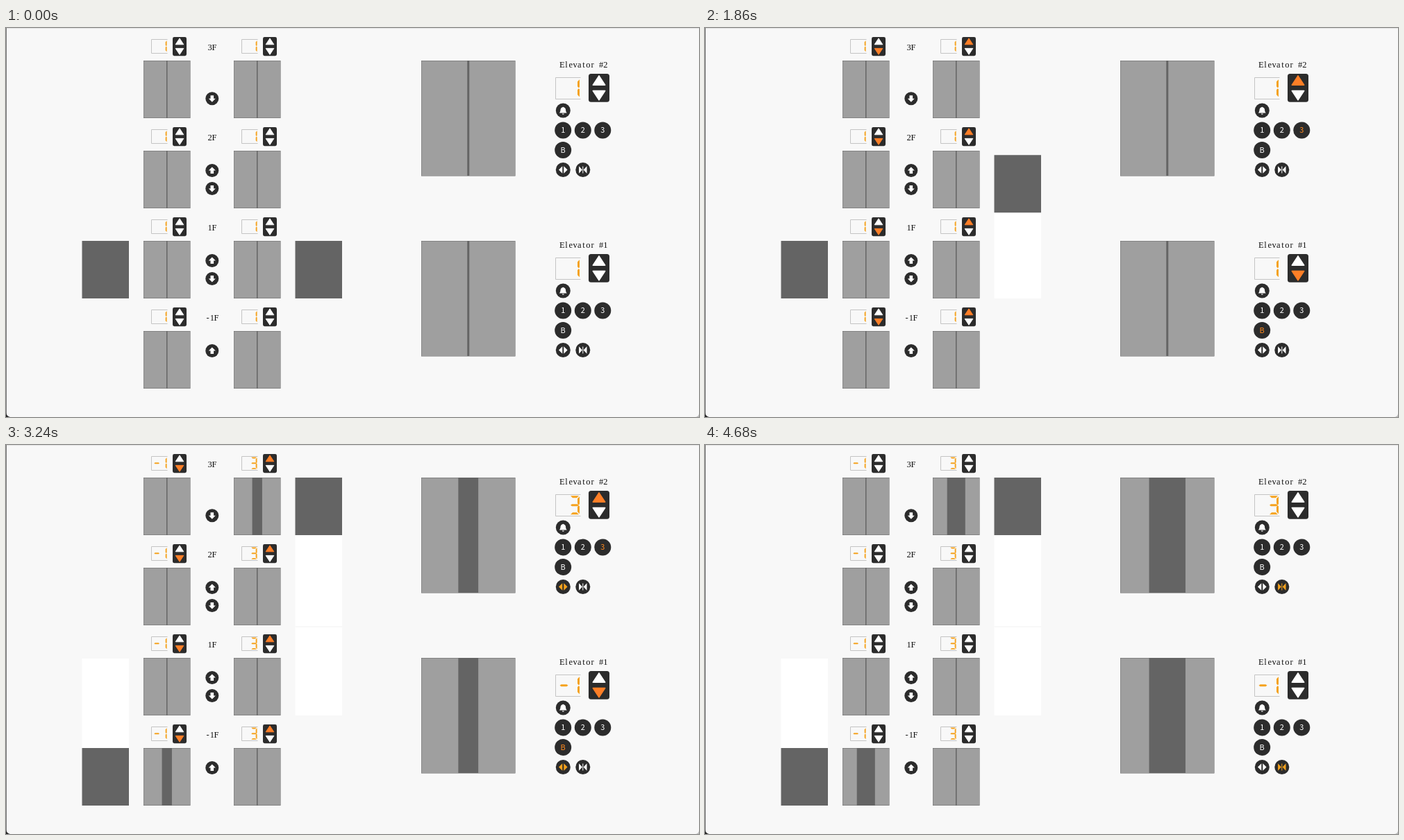
Animation, 998 px wide and 561 px high, one loop 4.71 s. Source, as an HTML page:

```html
<!DOCTYPE html>
<html lang="en">
<head>
<meta charset="utf-8">
<title>Elevators</title>
<style>
html, body { margin: 0; width: 100%; height: 100%; overflow: hidden; background: #f8f8f8; }
svg { display: block; width: 998px; height: 561px; }
text { text-anchor: middle; }
.label { font: 12.5px "Liberation Serif", serif; fill: #111; }
.key { font: 500 11px "Noto Sans CJK SC", "Noto Sans", sans-serif; }
.dark { fill: #2c2c2c; }
.car { fill: #646464; }
.door { fill: #9f9f9f; }
.seg { fill: #f5a21d; }
.frame { fill: none; stroke: #c4c4c4; }
</style>
</head>
<body>
<svg id="stage" viewBox="0 0 998 561"></svg>
<script>
const LOOP = 4710, STEP = 30;
const SPEED = 0.1067;               // car speed, px per ms
const WHITE = '#fff', ORANGE = '#ff7f27', AMBER = '#f5a21d';
const FLOORS = ['3F', '2F', '1F', '-1F'];
const floorY = i => 47 + 130 * i;

const SEG = {
  a: 'M1 0H13L10 3H4Z',
  b: 'M14 1V12L12.6 13L11 11V4Z',
  c: 'M14 26V15L12.6 14L11 16V23Z',
  d: 'M1 27H13L10 24H4Z',
  e: 'M0 26V15L1.4 14L3 16V23Z',
  g: 'M1 13.5L3 12H11L13 13.5L11 15H3Z'
};
const DIGITS = { 1: 'bc', 2: 'abged', 3: 'abgcd' };
const glyph = n => [...DIGITS[n]].map(s => SEG[s]).join('');

const cars = [
  { id: 1, x: 109.5, dir: 1, start: 1911, press: 1350, arrow: 1840, key: 'B', doorFloor: 3, hallX: 198, panelY: 307 },
  { id: 2, x: 416.5, dir: -1, start: 700, press: 450, arrow: 630, key: '3', doorFloor: 0, hallX: 328, panelY: 47 }
];
const OPEN = 3124, OPENED = 3720, CLOSE = 4320;

const rect = (x, y, w, h, attrs = '') =>
  `<rect x="${x}" y="${y}" width="${w}" height="${h}" ${attrs}/>`;
const group = (x, y, body, scale = 1) =>
  `<g transform="translate(${x} ${y}) scale(${scale})">${body}</g>`;

// Half-em character cells, centred on cx
function label(str, cx, y) {
  const cell = 6.25;
  const xs = [...str].map((_, i) => cx + (i - (str.length - 1) / 2) * cell);
  return `<text class="label" x="${xs.join(' ')}" y="${y}">${str}</text>`;
}

function doors(x, y, w, h, name) {
  return rect(x, y, w, h, 'class="car"') +
    `<g class="doors ${name}" data-x="${x}" data-w="${w}">` +
    rect(x, y + .5, 1, h - 1, 'class="door"').repeat(2) + '</g>';
}

function display(x, y, scale, id) {
  const w = 36 * scale, h = 30.5 * scale;
  return `<path class="frame" d="M${x + w} ${y}H${x}V${y + Math.round(h)}H${x + w}"/>` +
    group(x, y, `<path class="seg minus${id}" transform="translate(5 1.7)" d="${SEG.g}"/>` +
      `<path class="seg digit${id}" transform="translate(20.5 1.7)"/>`, scale);
}

function arrows(x, y, scale, id) {
  const tri = (cls, d) =>
    `<path class="${cls}${id}" d="${d}" stroke-width="1" stroke-linejoin="round"/>`;
  return group(x, y, rect(0, 0, 20, 27.2, 'rx="2.4" class="dark"') +
    tri('up', 'M10 1.9L15.8 10.8H4.2Z') + tri('down', 'M10 25.3L15.8 16.4H4.2Z'), scale);
}

const button = (x, y, r, body) =>
  group(x, y, `<circle r="${r}" class="dark"/>${body}`);

function hallButton(y, up) {
  return button(296.8, y, 9.5,
    `<path fill="#fff" transform="scale(1 ${up ? 1 : -1})" d="M0 -5L5 0H2.3V4.6H-2.3V0H-5Z"/>`);
}

function panel(car) {
  const { id, panelY: y } = car;
  const key = (x, dy, s) => button(x, y + dy, 12,
    `<text class="key key${id}${s}" y="4" fill="#fff">${s}</text>`);
  return doors(598, y, 135.5, 166.5, 'door' + id) +
    label('Elevator #' + id, 832, y + 10) +
    display(791.5, y + 24.5, 1, id) +
    arrows(839, y + 19, 1.5, id) +
    button(802.3, y + 72, 10.5,
      '<path fill="#fff" d="M-5.5 3.6C-3.6 1.8 -4 -.6 -3.6 -2C-3 -4 -1.6 -4.6 -.8 -4.8A.9 .9 0 0 1 .8 -4.8C1.6 -4.6 3 -4 3.6 -2C4 -.6 3.6 1.8 5.5 3.6ZM-1.5 4.4H1.5A1.5 1.3 0 0 1 -1.5 4.4Z"/>') +
    key(802.2, 100.4, '1') + key(830.8, 100.4, '2') + key(859.3, 100.4, '3') +
    key(802.2, 129, 'B') +
    button(802.3, y + 157.5, 10.5,
      `<path class="open${id}" d="M-6.3 0L-1 -5.2V5.2ZM6.3 0L1 -5.2V5.2Z"/>`) +
    button(830.8, y + 157.5, 10.5,
      `<path class="close${id}" d="M-5.7 -5.2L-.9 0L-5.7 5.2ZM5.7 -5.2L.9 0L5.7 5.2ZM-.5 -5H.5V5H-.5Z"/>`);
}

function hall(i) {
  const y = floorY(i);
  let out = label(FLOORS[i], 296.8, y - 15.5);
  for (const { id, hallX, doorFloor } of cars) {
    out += doors(hallX, y, 67.5, 83, i === doorFloor ? 'door' + id : 'shut') +
      display(hallX + 11.5, y - 30.5, .64, id) +
      arrows(hallX + 42, y - 34, 1, id);
  }
  if (i === 0) return out + hallButton(y + 54.8, false);
  if (i === 3) return out + hallButton(y + 28.5, true);
  return out + hallButton(y + 28.5, true) + hallButton(y + 54.5, false);
}

const stage = document.getElementById('stage');
stage.innerHTML =
  rect(0, 0, 998, 561, 'fill="#f8f8f8"') +
  rect(0, 0, 998, 1, 'fill="#e2e2e2"') +
  rect(0, 0, 1, 561, 'fill="#777"') +
  '<path fill="#222" d="M0 555Q.8 560.2 6 561H0Z"/><path fill="#bbb" d="M998 556Q997.5 560.5 993 561H998Z"/>' +
  rect(109.5, 308, 67.5, 0, 'id="trail1" fill="#fff"') +
  rect(416.5, 0, 67.5, 0, 'id="trail2" fill="#fff"') +
  rect(416.5, 261, 67.5, 2, 'fill="#f8f8f8"') +
  cars.map(c => rect(c.x, 307, 67.5, 83, `id="car${c.id}" class="car"`)).join('') +
  FLOORS.map((_, i) => hall(i)).join('') +
  cars.map(panel).join('');

const all = sel => [...stage.querySelectorAll(sel)];
const set = (els, attr, val) => els.forEach(el => el.setAttribute(attr, val));
const clamp = v => Math.max(0, Math.min(1, v));

function setDoors(els, open) {
  for (const el of els) {
    const x = +el.dataset.x, w = +el.dataset.w;
    const leaf = w / 2 * .978 * (1 - open);
    const [left, right] = el.children;
    const shown = Math.max(0, leaf - .4);
    set([left], 'x', x + .4);
    set([right], 'x', x + w - leaf);
    set([left, right], 'width', shown);
  }
}

for (const c of cars) {
  const pick = name => all(`.${name}${c.id}`);
  c.parts = {
    up: pick('up'), down: pick('down'), minus: pick('minus'), digit: pick('digit'),
    doors: pick('door'), open: pick('open'), close: pick('close'),
    key: all(`.key${c.id}${c.key}`), body: all('#car' + c.id), trail: all('#trail' + c.id)
  };
}
setDoors(all('.shut'), 0);

function render(t) {
  const open = t < CLOSE ? clamp((t - OPEN) / 596) : 1 - clamp((t - CLOSE) / 574);
  for (const c of cars) {
    const p = c.parts, down = c.dir > 0;
    const span = down ? 130 : 260;
    const dist = Math.min(span, Math.max(0, (t - c.start) * SPEED));
    const y = 307 + c.dir * dist;
    set(p.body, 'y', y);
    if (down) {
      set(p.trail, 'height', Math.max(0, dist - 1));
    } else {
      set(p.trail, 'y', y + 83);
      set(p.trail, 'height', dist);
    }

    const arrived = dist >= span;
    const num = down ? 1 : arrived ? 3 : dist >= 130 ? 2 : 1;
    set(p.digit, 'd', glyph(num));
    set(p.minus, 'visibility', down && arrived ? 'visible' : 'hidden');

    const moving = t >= c.arrow && t < CLOSE;
    const paint = (els, on, color) => {
      set(els, 'fill', on ? color : WHITE);
    };
    for (const side of ['up', 'down']) {
      const on = moving && (side === 'down') === down;
      paint(p[side], on, ORANGE);
      set(p[side], 'stroke', on ? ORANGE : WHITE);
    }
    paint(p.key, t >= c.press && t < OPENED, '#ff8a20');
    paint(p.open, t >= OPEN && t < OPENED, AMBER);
    paint(p.close, t >= CLOSE, AMBER);
    setDoors(p.doors, open);
  }
}

const origin = performance.now();
function tick() {
  const t = (performance.now() - origin) % LOOP;
  render(Math.floor(t / STEP) * STEP);
  requestAnimationFrame(tick);
}
render(0);
requestAnimationFrame(tick);
</script>
</body>
</html>
```
